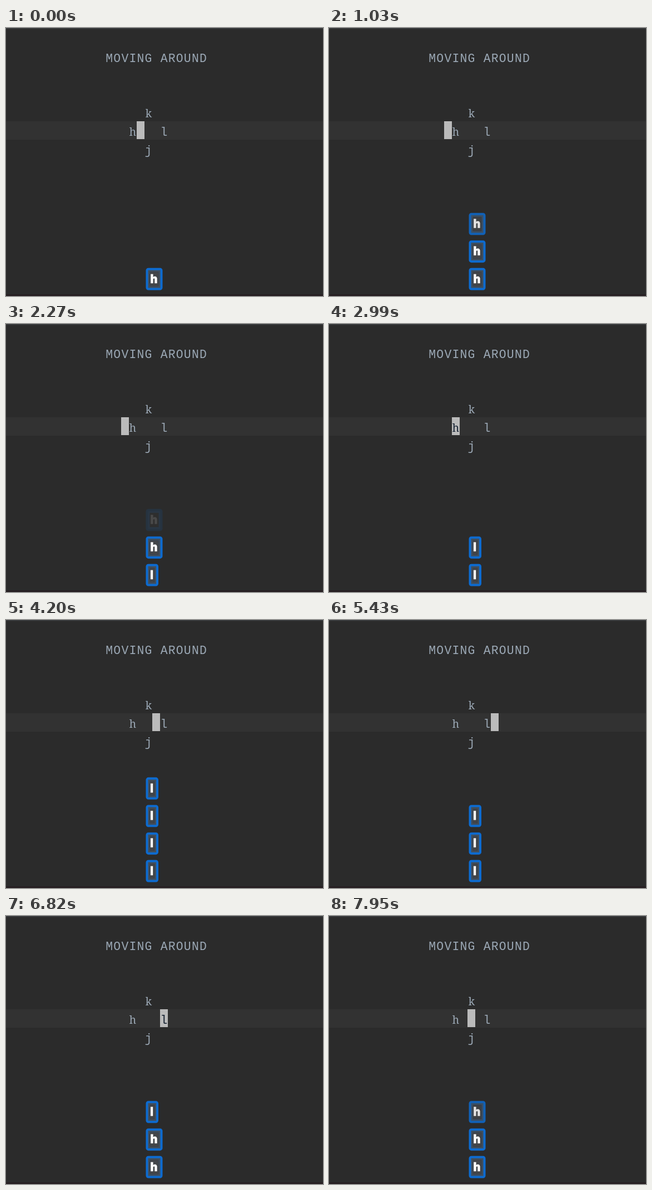
An HTML page for the animation above (8000 ms loop, 570 by 480 pixels).

```html
<!DOCTYPE html>
<html lang="en">
<head>
<meta charset="utf-8">
<title>Moving around</title>
<style>
  html, body { margin: 0; width: 100%; height: 100%; overflow: hidden; background: #2b2b2b; }
  svg { display: block; width: 570px; height: 480px; }
  .mono { font: 21.4px "Liberation Mono", "Courier New", monospace; fill: #9ba8b5; white-space: pre; }
  .title { letter-spacing: 1.22px; }
  .center { text-anchor: middle; }
  .slab { font: 300 19.5px "Noto Serif", "Liberation Serif", serif; }
  .key { font: 800 20.5px "Open Sans", "Noto Sans", sans-serif; fill: #fff; stroke: #fff; stroke-width: .4; text-anchor: middle; }
</style>
</head>
<body>
<svg id="stage" viewBox="0 0 570 480" xmlns="http://www.w3.org/2000/svg">
  <defs>
    <filter id="soft" x="-50%" y="-50%" width="200%" height="200%">
      <feGaussianBlur stdDeviation="1.2"/>
    </filter>
  </defs>
  <rect width="570" height="480" fill="#2b2b2b"/>
  <rect width="570" height="1.5" fill="#3c3f41"/>
  <rect y="477" width="570" height="3" fill="#261f22"/>
  <rect y="167" width="570" height="33" fill="#323232"/>
  <rect id="cursor" y="167" width="14" height="32" fill="#bbbbbb"/>
  <text class="mono title" x="179.3" y="60.5">MOVING AROUND</text>
  <text class="mono center slab" x="256.5" y="159.5">k</text>
  <text class="mono center slab" x="228" y="192.5" id="left">h</text>
  <text class="mono center" x="284" y="192.5" id="right">l</text>
  <text class="mono center" x="256" y="225.5">j</text>
  <g id="badges"></g>
</svg>
<script>
const LOOP = 8000, CELL = 14, HOME = 249, ROW = 49.33, STEP = 88;
const $ = id => document.getElementById(id);

// key, time pressed, fade start, fade end
const presses = [
  ["h", -260, 1030, 1300],
  ["h", 180, 1470, 1820],
  ["h", 600, 2000, 2350],
  ["h", 1210, 2610, 2990],
  ["l", 2260, 3660, 4030],
  ["l", 2900, 4290, 4640],
  ["l", 3230, 4550, 4900],
  ["l", 3750, 5060, 5430],
  ["l", 4200, 5590, 5850],
  ["l", 4720, 6110, 6380],
  ["l", 5240, 6550, 6820],
  ["l", 5680, 6980, 7360],
  ["h", 6290, 7600, 7950],
  ["h", 6640, 7950, 8300],
  ["h", 7160, 8500, 8850],
  ["h", 7690, 9000, 9350]
].map(([key, at, from, to]) => ({ key, at, from, to, node: makeBadge(key) }));

function add(parent, tag, attrs) {
  const node = document.createElementNS("http://www.w3.org/2000/svg", tag);
  for (const name in attrs) node.setAttribute(name, attrs[name]);
  return parent.appendChild(node);
}

// The blue frame runs on under the grey ring, so it shows through as the layers fade.
function makeBadge(key) {
  const w = key === "h" ? 30 : 22.5;
  const g = add($("badges"), "g", { visibility: "hidden" });
  const layer = (inset, attrs) => add(g, "rect", {
    x: 251.5 + inset, y: 429.8 + inset, width: w - 2 * inset, height: 39.7 - 2 * inset,
    fill: "none", ...attrs
  });
  layer(3.5, { rx: 1, stroke: "#0d6bd0", "stroke-width": 7 , "stroke-linejoin": "round" });
  layer(5.5, { stroke: "#41505f", "stroke-width": 3 });
  layer(6.5, { fill: "#424548", filter: "url(#soft)" });
  add(g, "text", { class: "key", x: 250.8 + w / 2, y: 456.5 }).textContent = key;
  return g;
}

// Fades run in coarse steps, counted back from the moment the badge is gone.
function opacity(p, t) {
  if (t < p.at || t >= p.to) return 0;
  if (t < p.from) return 1;
  return Math.min(0.85, 0.13 + 0.24 * (Math.ceil((p.to - t) / STEP) - 1));
}

function draw(t) {
  let column = 0;
  let row = 0;
  for (let i = presses.length - 1; i >= 0; i--) {
    const p = presses[i];
    const alpha = opacity(p, t);
    p.node.setAttribute("visibility", alpha ? "visible" : "hidden");
    for (const part of p.node.children) part.setAttribute("opacity", alpha);
    p.node.setAttribute("transform", `translate(0 ${-ROW * row})`);
    if (t >= p.at) {
      row++;
      column += p.key === "l" ? 1 : -1;
    }
  }
  $("cursor").setAttribute("x", HOME + column * CELL);
  $("left").style.fill = column === -2 ? "#162232" : "";
  $("right").style.fill = column === 2 ? "#162232" : "";
}

const start = performance.now();
function tick() {
  draw((performance.now() - start) % LOOP);
  requestAnimationFrame(tick);
}
tick();
</script>
</body>
</html>
```
